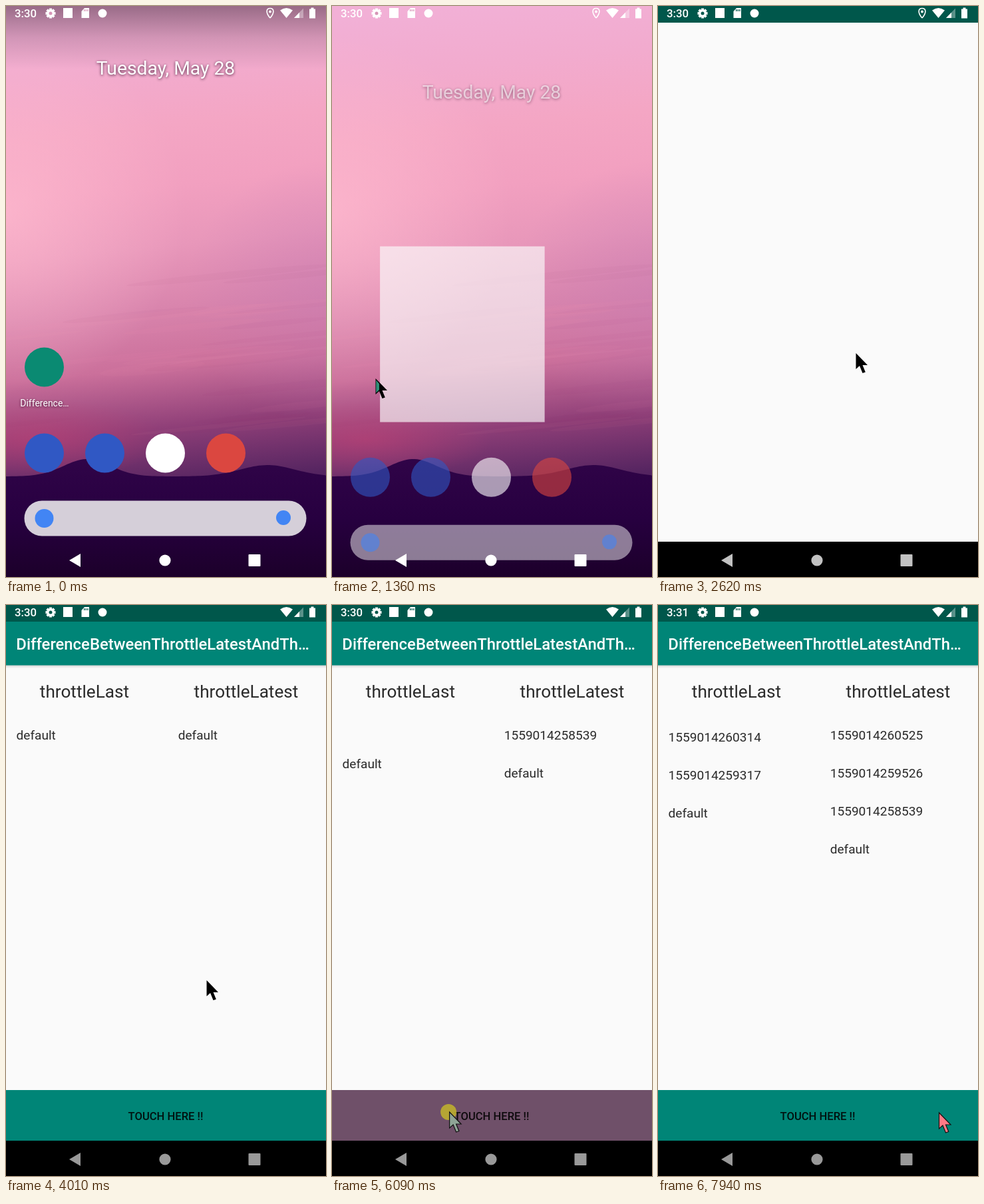
These frames come from a looping animation (481x857 px, 8000 ms). An HTML page with a canvas:

```html
<!DOCTYPE html>
<html lang="en">
<head>
<meta charset="utf-8">
<title>Throttle demo</title>
<style>
  html, body { margin: 0; width: 100%; height: 100%; overflow: hidden; background: #000; }
  canvas { display: block; }
</style>
</head>
<body>
<canvas id="stage" width="481" height="857"></canvas>
<script>
const W = 481, H = 857, LOOP = 8000;
const ctx = document.getElementById('stage').getContext('2d');
const TEAL = '#008577', DARK_TEAL = '#00574b', PAPER = '#fafafa', INK = '#2a2a2a';

const clamp = v => Math.max(0, Math.min(1, v));
const mix = (a, b, p) => a + (b - a) * p;
const ramp = (t, a, b) => clamp((t - a) / (b - a));
const ease = p => 0.5 - Math.cos(Math.PI * clamp(p)) / 2;
const bump = (x, center, width) => Math.exp(-(((x - center) / width) ** 2));

function rect(x, y, w, h, fill, radius = 0) {
  ctx.fillStyle = fill;
  ctx.beginPath();
  ctx.roundRect(x, y, w, h, radius);
  ctx.fill();
}
function disc(x, y, r, fill) {
  ctx.fillStyle = fill;
  ctx.beginPath();
  ctx.arc(x, y, r, 0, Math.PI * 2);
  ctx.fill();
}
function poly(points, fill) {
  ctx.fillStyle = fill;
  ctx.beginPath();
  points.forEach(([x, y]) => ctx.lineTo(x, y));
  ctx.closePath();
  ctx.fill();
}
function text(str, x, y, size, fill, align = 'left', weight = 400) {
  ctx.font = `${weight} ${size}px Roboto, sans-serif`;
  ctx.textAlign = align;
  ctx.fillStyle = fill;
  ctx.fillText(str, x, y);
}
function shadowText(...args) {
  ctx.save();
  ctx.shadowColor = 'rgba(50,10,40,.85)';
  ctx.shadowBlur = 4;
  ctx.shadowOffsetY = 1;
  text(...args);
  ctx.restore();
}
// Linear gradient through evenly spaced colours
function blend(x0, y0, x1, y1, colors) {
  const g = ctx.createLinearGradient(x0, y0, x1, y1);
  colors.forEach((c, i) => g.addColorStop(i / (colors.length - 1), c));
  return g;
}
function faded(alpha, draw) {
  ctx.save();
  ctx.globalAlpha *= alpha;
  draw();
  ctx.restore();
}
function glow(x, y, rx, ry, rgb, alpha) {
  ctx.save();
  ctx.translate(x, y);
  ctx.scale(1, ry / rx);
  const g = ctx.createRadialGradient(0, 0, 0, 0, 0, rx);
  g.addColorStop(0, `rgba(${rgb},${alpha})`);
  g.addColorStop(1, `rgba(${rgb},0)`);
  disc(0, 0, rx, g);
  ctx.restore();
}

function wallpaper() {
  rect(0, 0, W, H, blend(205, 0, 275, 720, [
    '#f2b0d6', '#f2abce', '#f4a6c4', '#f2a0c0', '#e897ba', '#d985ad', '#cb709b', '#8f3f78', '#542460'
  ]));
  glow(0, 310, 270, 270, '255,188,208', 0.7);
  glow(500, 430, 230, 200, '200,125,180', 0.5);
  glow(50, 650, 190, 60, '195,65,115', 0.55);

  // Thin streaks of cloud
  let seed = 7;
  const rnd = () => (seed = seed * 16807 % 2147483647) / 2147483647;
  for (let i = 0; i < 26; i++) {
    ctx.fillStyle = i % 2 ? 'rgba(255,150,180,.04)' : 'rgba(120,30,110,.03)';
    ctx.beginPath();
    ctx.ellipse(rnd() * W, 390 + rnd() * 260, 60 + rnd() * 140, 2 + rnd() * 7, -0.1, 0, Math.PI * 2);
    ctx.fill();
  }

  const hills = [[W, H], [0, H]];
  for (let x = 0; x <= W; x += 4) {
    hills.push([x, 706 - 26 * bump(x, 122, 50) - 17 * bump(x, 393, 58)]);
  }
  hills.push([W, 705]);
  poly(hills, blend(0, 680, 0, H, ['#300448', '#270040', '#1c002a']));
}

function home() {
  shadowText('Tuesday, May 28', 240, 103, 28.3, '#fff', 'center');
  ['#3058c4', '#3058c4', '#fff', '#db4740'].forEach((c, i) => disc(57.5 + 91 * i, 671, 29.5, c));
  rect(27.5, 742.5, 424, 53, '#d5cfd9', 26.5);
  disc(57.5, 769, 14, '#4285f4');
  disc(417, 768, 11, '#4285f4');
}

function appIcon() {
  disc(57.5, 542, 29.5, '#0a8a72');
  shadowText('Difference…', 58, 601, 14, '#fff', 'center');
}

function gear(x, y, hole) {
  for (let i = 0; i < 4; i++) {
    ctx.save();
    ctx.translate(x, y);
    ctx.rotate(i * Math.PI / 4);
    rect(-2, -7.5, 4, 15, '#fff');
    ctx.restore();
  }
  disc(x, y, 5.6, '#fff');
  disc(x, y, 2.5, hole);
}

function locationPin() {
  ctx.strokeStyle = '#fff';
  ctx.lineWidth = 1.6;
  ctx.beginPath();
  ctx.moveTo(397, 18);
  ctx.bezierCurveTo(390, 10, 391, 3.5, 397, 3.5);
  ctx.bezierCurveTo(403, 3.5, 404, 10, 397, 18);
  ctx.stroke();
  disc(397, 8.6, 2, '#fff');
}

function statusIcons(t, back) {
  text(t < 6300 ? '3:30' : '3:31', 13, 17, 16.8, '#fff', 'left', 500);
  gear(67, 11, back);
  rect(86, 3, 14, 15, '#fff');
  poly([[118, 3], [125, 3], [125, 18], [113.5, 18], [113.5, 8]], '#fff');
  for (let x = 117; x < 124; x += 2.6) rect(x, 5, 1.3, 3, back);
  disc(145, 11, 6.5, '#fff');
  if (t < 3000) locationPin();

  ctx.fillStyle = '#fff';
  ctx.beginPath();
  ctx.moveTo(421.5, 18);
  ctx.lineTo(412, 6.5);
  ctx.quadraticCurveTo(421.5, -0.5, 431, 6.5);
  ctx.fill();

  poly([[433, 18], [447, 18], [447, 3.5]], 'rgba(255,255,255,.35)');
  poly([[433, 18], [441, 18], [441, 9.7]], '#fff');
  rect(456, 4.5, 9, 14, '#fff');
  rect(458.5, 2.5, 4, 3, '#fff');
}

function navButtons(t) {
  const v = mix(255, 153, ramp(t, 1830, 3150));
  const c = `rgb(${v},${v},${v})`;
  poly([[95, 832], [112, 822], [112, 842]], c);
  disc(239, 832, 8.6, c);
  rect(364.5, 823, 18, 18, c, 1);
}

// Each value is a timestamp: it slides the older rows down, then fades in on top
const EPOCH = 1559014000000;
function list(t, x, lag, values) {
  let y = 202.3;
  for (const v of [...values].reverse()) {
    const age = t - (v - lag);
    faded(ramp(age, 250, 370), () => text(EPOCH + v, x, y, 19.1, INK));
    y += 57 * ease(age / 250);
  }
  text('default', x, y, 19.1, INK);
}

function button(t) {
  ctx.save();
  ctx.beginPath();
  ctx.rect(0, 728, W, 76);
  ctx.clip();
  rect(0, 728, W, 76, TEAL);
  if (t > 5080) {
    faded(1 - ramp(t, 7330, 7550), () => disc(348, 770, mix(20, 360, ramp(t, 5080, 5300)), '#6f5069'));
  }
  ctx.restore();
  text('TOUCH HERE !!', 240, 772.5, 16.6, 'rgba(0,0,0,.87)', 'center', 500);
}

function app(t) {
  rect(0, 0, W, H, PAPER);
  if (t > 2660) {
    rect(0, 90, W, 5, blend(0, 90, 0, 95, ['rgba(0,0,0,.16)', 'rgba(0,0,0,0)']));
    rect(0, 25, W, 65.5, TEAL);
    text('DifferenceBetweenThrottleLatestAndTh…', 15.3, 67, 23.85, '#fff', 'left', 500);
    text('throttleLast', 118, 139, 26.2, INK, 'center');
    text('throttleLatest', 361, 139, 26.2, INK, 'center');
    list(t, 15.5, 253394, [259317, 260314, 261302]);
    list(t, 258.7, 253380, [258539, 259526, 260525]);
    button(t);
  }
  rect(0, 804, W, 53, '#000');
  rect(0, 0, W, 25, DARK_TEAL);
}

function launcher(t) {
  const p = ramp(t, 1128, 1628);
  wallpaper();
  faded(1 - ramp(p, 0, 0.4), () =>
    rect(0, 0, W, 95, blend(0, 0, 0, 95, ['rgba(40,20,35,.44)', 'rgba(40,20,35,.16)', 'rgba(40,20,35,0)'])));

  ctx.save();
  ctx.translate(0, 78 * p);
  faded(1 - p * 0.86, home);
  ctx.restore();

  if (!p) return appIcon();
  const w = mix(59, W, ease(p));
  const h = mix(59, H, p ** 1.78);
  const cx = mix(57.5, W / 2, 1 - (1 - p) ** 2.25);
  const cy = mix(542, H / 2, p ** 1.09);
  faded(clamp(p * 1.42), () => rect(cx - w / 2, cy - h / 2, w, h, PAPER));
}

// Pointer legs: begin, end, then the place reached
const legs = [
  [130, 900, 65, 559], [1440, 2220, 297, 521], [3930, 4010, 301, 563], [4010, 4620, 348, 770],
  [5080, 6090, 176, 761], [6090, 7250, 331, 774], [7250, 7720, 422, 762]
];
const pointerAt = t => legs.reduce(([x, y], [a, b, x1, y1]) => {
  const p = ramp(t, a, b);
  return [mix(x, x1, p), mix(y, y1, p)];
}, [378, 820]);

const TAP = 197;
const isPressed = t =>
  (t >= 1050 && t < 1130) || (t >= 5080 && t < 7326 && (t - 5159 + TAP) % TAP > 85);

function pointer(t) {
  if (t < 130) return;
  const pressed = isPressed(t), overButton = t >= 4850;
  ctx.save();
  ctx.translate(...pointerAt(t));
  if (pressed) disc(-1, 0, 12, 'rgba(194,180,44,.85)');
  const fill = !overButton ? '#000' : pressed ? '#8fa596' : '#ff7a86';
  poly([[0.5, 0], [0.5, 24], [6, 19], [10.5, 30], [14.8, 28.5], [10.5, 18], [18, 18]], fill);
  if (overButton) {
    ctx.strokeStyle = '#111';
    ctx.lineWidth = 1.2;
    ctx.stroke();
  }
  if (t >= 1050 && t < 1440) poly([[1.3, 2.5], [1.3, 21.5], [6, 17], [6, 8]], '#2f8f78');
  ctx.restore();
}

function draw(t) {
  const opened = ramp(t, 1600, 1750);
  if (opened < 1) launcher(t);
  if (opened) faded(opened, () => app(t));
  statusIcons(t, opened ? DARK_TEAL : '#d795b7');
  navButtons(t);
  pointer(t);
}

const start = performance.now();
function loop() {
  draw((performance.now() - start) % LOOP);
  requestAnimationFrame(loop);
}
loop();
</script>
</body>
</html>
```
